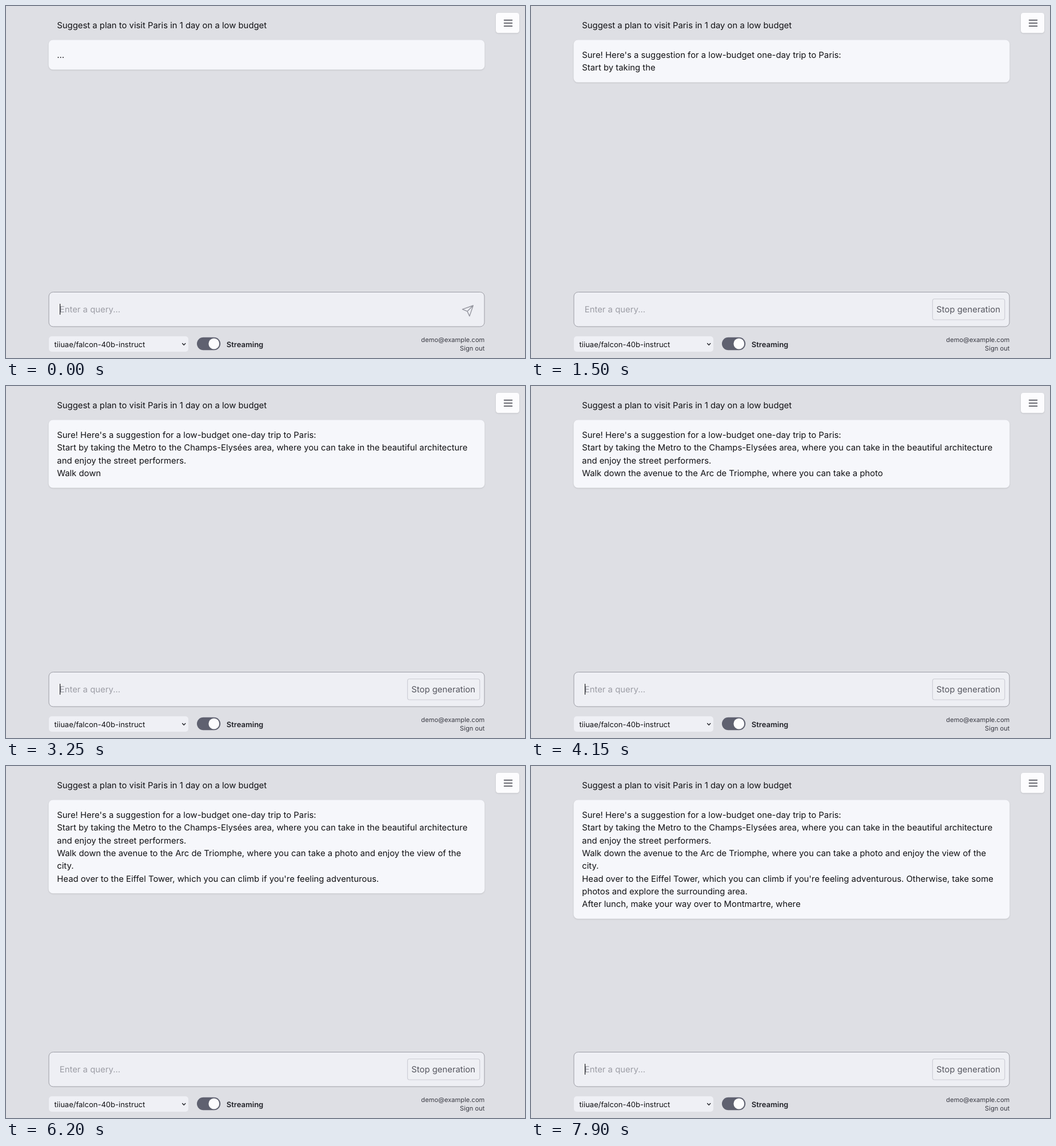
Recreate the animation shown at these times as an HTML page. Size 908x617 px, loop 8 s.

```html
<!DOCTYPE html>
<html lang="en">
<head>
<meta charset="utf-8">
<title>Chat streaming</title>
<style>
  html, body { margin: 0; width: 100%; height: 100%; overflow: hidden; background: #dedfe4; }
  svg { display: block; width: 908px; height: 617px; }
  text { font: 14.85px Inter, "Open Sans", sans-serif; fill: #111114; white-space: pre; text-rendering: geometricPrecision; }
  .muted { fill: #9c9da5; }
  .option { font-size: 13.03px; }
  .label { font-size: 13.03px; font-weight: 600; fill: #202127; }
  .account { font-size: 11.16px; fill: #3a3b44; text-anchor: end; }
  .line { fill: none; stroke-linecap: round; stroke-linejoin: round; }
  .card { filter: drop-shadow(0 1px 1px rgba(0, 0, 0, .13)); }
</style>
</head>
<body>
<svg viewBox="0 0 908 617">
  <rect width="908" height="617" fill="#dedfe4"/>
  <text x="89.3" y="39">Suggest a plan to visit Paris in 1 day on a low budget</text>

  <rect class="card" x="857" y="12" width="41" height="35.3" rx="4.5" fill="#fcfcfe"/>
  <path class="line" d="M871.5 24.8h14M871.5 30h14M871.5 35.2h14" stroke="#3b3c46" stroke-width="1.5"/>

  <rect class="card" id="card" x="74.6" y="59.5" width="762.8" height="52" rx="7.5" fill="#f6f7fb"/>
  <g id="reply"></g>

  <rect x="75" y="501.5" width="762" height="60.5" rx="7.5" fill="#eeeff4" stroke="#9b9ca4"/>
  <text class="muted" x="93.8" y="537">Enter a query...</text>
  <rect id="caret" x="94" y="522" width="1.1" height="19" fill="#111114"/>
  <path id="send" class="line" d="M817.3 525L798.5 531.6L807 535.2L811 543.6ZL807 535.2" stroke="#94959e" stroke-width="1.4"/>
  <g id="stop">
    <rect x="702.5" y="513.5" width="126.3" height="36.5" rx="3.5" fill="#eff0f4" stroke="#cdced5" stroke-width="1.2"/>
    <text x="709.3" y="537" fill="#55565f" style="fill:#55565f">Stop generation</text>
  </g>

  <rect x="75" y="579" width="244" height="27" rx="5" fill="#eff0f5"/>
  <text class="option" x="84.6" y="597.5">tiiuae/falcon-40b-instruct</text>
  <path class="line" d="M308.6 591.6l2.6 2.7l2.6-2.7" stroke="#222329" stroke-width="1.4"/>
  <rect x="334" y="580.7" width="41.2" height="22.6" rx="11.3" fill="#5f6170"/>
  <circle cx="363.8" cy="592" r="9.4" fill="#fcfcfe"/>
  <text class="label" x="385.8" y="597.5">Streaming</text>
  <text class="account" x="837.4" y="589">demo@example.com</text>
  <text class="account" x="837.4" y="604">Sign out</text>
</svg>
<script>
const LOOP = 8000;
const LINE_HEIGHT = 22.33;
const STOP_SHOWN = 50;

// Moments at which the caret flips; it starts visible.
const CARET_FLIPS = [150, 750, 1300, 1900, 2450, 3000, 3600, 4150, 4750, 5350, 5850, 6450, 7000, 7550];

// Streamed pieces of the reply: [arrival time, text].
const CHUNKS = [
  [150, "Sure"], [200, "!"], [250, " Here"], [300, "'s"], [400, " a"], [450, " suggestion"],
  [550, " for"], [600, " a"], [650, " low"], [700, "-budget"],
  [1050, " one-day trip to"], [1100, " Paris:"], [1300, "\nStart by"], [1500, " taking the"],
  [1750, " Metro to"], [1900, " the Champs"], [2050, "-Elysées area,"],
  [2400, " where you can take"], [2450, " in the"], [2650, " beautiful architecture\nand"],
  [2950, " enjoy the"], [3000, " street performers."], [3250, "\nWalk down"],
  [3600, " the avenue to the"], [3650, " Arc de"], [3850, " Triomphe, where"],
  [4150, " you can take a photo"], [4250, " and enjoy"], [4450, " the view of"],
  [4750, " the"], [4800, "\ncity."],
  [5200, "\nHead over to the E"], [5350, "iffel Tower,"], [5550, " which you"],
  [5850, " can climb"], [5900, " if you"],
  [6200, "'re feeling adventurous."], [6450, " Otherwise, take"], [6500, " some\nphotos"],
  [6900, " and explore the"], [7000, " surrounding"], [7050, " area."],
  [7250, "\nAfter lunch,"], [7500, " make your"], [7550, " way over"], [7700, " to Montm"], [7900, "artre, where"]
];

const el = id => document.getElementById(id);
const show = (id, on) => el(id).setAttribute("visibility", on ? "visible" : "hidden");

const rows = Array.from({ length: 8 }, (_, i) => {
  const row = document.createElementNS("http://www.w3.org/2000/svg", "text");
  row.setAttribute("x", 89.3);
  row.setAttribute("y", 91 + i * LINE_HEIGHT);
  return el("reply").appendChild(row);
});

function replyAt(t) {
  return CHUNKS.filter(([at]) => at <= t).map(([, text]) => text).join("") || "...";
}

function render(t) {
  const lines = replyAt(t).split("\n");
  rows.forEach((row, i) => {
    const text = lines[i] || "";
    if (row.textContent !== text) row.textContent = text;
  });
  el("card").setAttribute("height", 52 + (lines.length - 1) * LINE_HEIGHT);
  show("caret", CARET_FLIPS.filter(at => at <= t).length % 2 === 0);
  show("send", t < STOP_SHOWN);
  show("stop", t >= STOP_SHOWN);
}

const start = performance.now();
function tick() {
  render((performance.now() - start) % LOOP);
  requestAnimationFrame(tick);
}
render(0);
requestAnimationFrame(tick);
</script>
</body>
</html>
```
